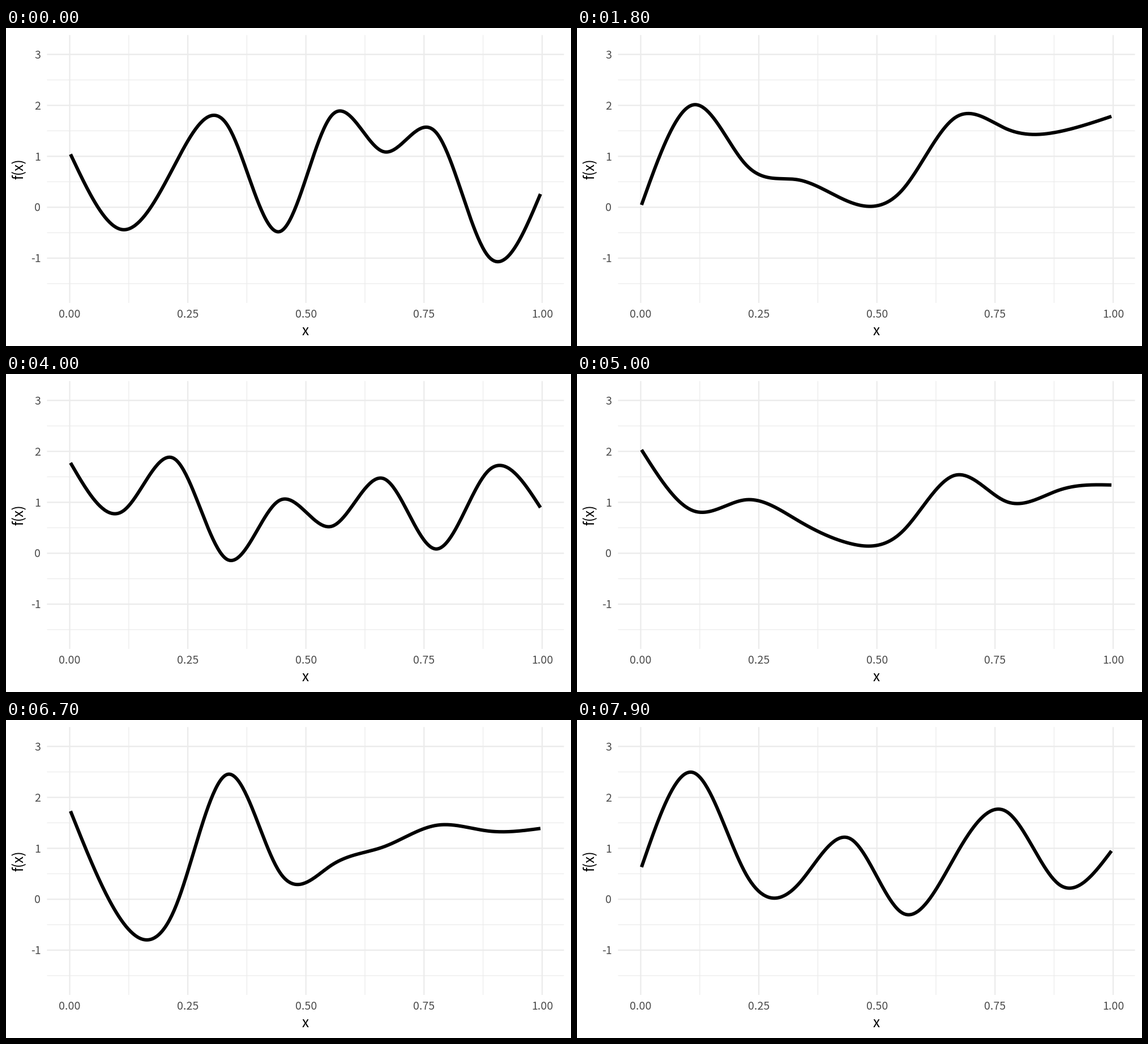
Recreate the animation shown at these times as a matplotlib script. Size 998 by 561 pixels, loop 8000 ms.

```python
import numpy as np
import matplotlib.pyplot as plt
from matplotlib.animation import FuncAnimation

W, H, DPI = 998, 561, 64
PT = 72 / DPI  # points per pixel
FRAMES, INTERVAL = 80, 100

LEFT, RIGHT, TOP, BOTTOM = 72.5, 985.5, 12.5, 485
X0, X_UNIT = 112.5, 834.5
Y0, Y_UNIT = 316.2, 89.85
FONT = "Noto Sans CJK JP"

# Each resting curve is a natural spline through ten evenly spaced heights.
KNOTS = np.arange(10)
waves = np.array([1.04, -.44, .84, 1.62, -.48, 1.80, 1.09, 1.47, -.96, .26])
late_peak = np.array([1.40, 1.68, 2.24, .76, 2.27, -.43, .23, 1.10, 2.66, .14])
two_hills = np.array([-.19, 2.07, .59, .50, -.28, .48, 2.02, 1.61, 1.28, 2.07])
ripples = np.array([.94, .66, .33, 1.74, .75, .92, .60, .11, 1.18, .04])
valley = np.array([2.03, .83, 1.05, .64, .19, .43, 1.53, 1.01, 1.24, 1.34])
dip = np.array([1.73, -.45, -.18, 2.45, .54, .67, 1.03, 1.45, 1.34, 1.39])
rolling = np.array([.61, 2.53, .50, .25, 1.20, -.29, .83, 1.72, .27, .96])

# The dip swings deeper with a raised end, then back the other way.
swing = (1.05 * np.exp(-((KNOTS - 9) / 0.6)**2)
         - 0.7 * np.exp(-((KNOTS - 1.4) / 0.7)**2))
drift = np.random.default_rng(4).uniform(-0.3, 1.9, 10)

CURVES = [waves, late_peak, two_hills, ripples, drift, valley,
          dip + swing, dip - swing, rolling]


def natural_spline(y, samples=400):
    """Natural cubic spline through evenly spaced knots."""
    n = len(y)
    system = 4 * np.eye(n - 2) + np.eye(n - 2, k=1) + np.eye(n - 2, k=-1)
    bend = np.zeros(n)
    bend[1:-1] = np.linalg.solve(system, 6 * np.diff(y, 2))
    u = np.linspace(0, n - 1, samples)
    i = np.minimum(u.astype(int), n - 2)
    b = u - i
    a = 1 - b
    return (a * y[i] + b * y[i + 1]
            + ((a**3 - a) * bend[i] + (b**3 - b) * bend[i + 1]) / 6)


def cubic_in_out(t):
    return 4 * t**3 if t < 0.5 else 1 - 4 * (1 - t)**3


def heights(frame):
    state, step = divmod(frame, 10)
    hold = 3 if state == 0 else 4
    t = cubic_in_out(max(0, step - hold) / (10 - hold))
    return (1 - t) * CURVES[state] + t * CURVES[state + 1]


def x_px(v):
    return X0 + X_UNIT * v


def y_px(v):
    return Y0 - Y_UNIT * v


def grid(xs, ys, width):
    style = dict(color="#EBEBEB", lw=width * PT, snap=False,
                 solid_capstyle="butt")
    for v in xs:
        ax.plot([x_px(v)] * 2, [TOP, BOTTOM], **style)
    for v in ys:
        ax.plot([LEFT, RIGHT], [y_px(v)] * 2, **style)


def label(x, y, text, size, color, ha="center", rotation=0):
    ax.text(x, y, text, fontsize=size * PT, color=color, ha=ha,
            va="baseline", rotation=rotation, rotation_mode="anchor",
            family=FONT)


fig = plt.figure(figsize=(W / DPI, H / DPI), dpi=DPI, facecolor="white")
ax = fig.add_axes([0, 0, 1, 1])
ax.set(xlim=(0, W), ylim=(H, 0))
ax.axis("off")

x_ticks, y_ticks = np.arange(5) / 4, range(-1, 4)
grid(np.arange(4) / 4 + 0.125, np.arange(-1.5, 3), 1.2)
grid(x_ticks, y_ticks, 2.3)

for v in x_ticks:
    label(x_px(v), 511, f"{v:.2f}", 19.7, "#4D4D4D")
for v in y_ticks:
    label(61.5, y_px(v) + 7.2, str(v), 19.7, "#4D4D4D", ha="right")
label(529, 541.5, "x", 24.5, "black")
label(30.5, 249, "f(x)", 24.5, "black", rotation=90)

curve, = ax.plot(np.linspace(114, 944, 400), y_px(natural_spline(waves)),
                 color="black", lw=6 * PT, solid_capstyle="butt",
                 solid_joinstyle="round", zorder=5)


def update(frame):
    curve.set_ydata(y_px(natural_spline(heights(frame))))
    return curve,


anim = FuncAnimation(fig, update, frames=FRAMES, interval=INTERVAL,
                     repeat=True, repeat_delay=0)
plt.show()
```
